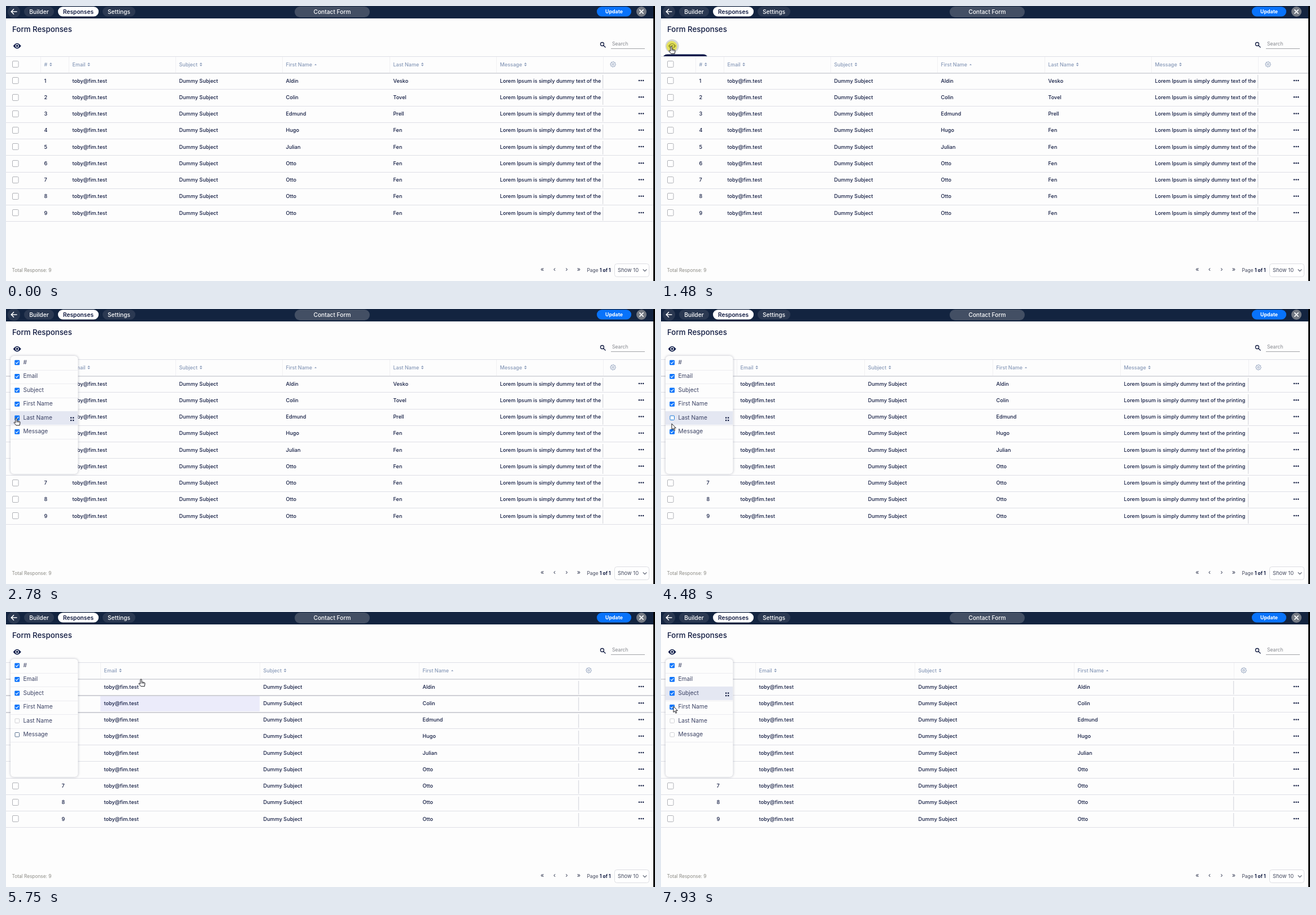
Recreate the animation shown at these times as an HTML page with a canvas. Size 1149 by 487 pixels, loop 8000 ms.

```html
<!DOCTYPE html>
<html lang="en">
<head>
<meta charset="utf-8">
<title>Form Responses</title>
<style>
  html, body { margin: 0; width: 100%; height: 100%; overflow: hidden; background: #fdfdfd; }
  canvas { display: block; }
</style>
</head>
<body>
<canvas id="stage" width="1149" height="487"></canvas>
<script>
const ctx = document.getElementById('stage').getContext('2d');
const LOOP = 8000;
const NAVY = '#101a40', LABEL = '#8799b8', LINE = '#dedfe6', PAPER = '#fdfdfd', BLUE = '#0873fb';

const FIELDS = ['#', 'Email', 'Subject', 'First Name', 'Last Name', 'Message'];
const PEOPLE = [['Aldin', 'Vesko'], ['Colin', 'Tovel'], ['Edmund', 'Prell'], ['Hugo', 'Fen'], ['Julian', 'Fen'],
  ['Otto', 'Fen'], ['Otto', 'Fen'], ['Otto', 'Fen'], ['Otto', 'Fen']];
// Column edges with zero, one and two hidden columns
const EDGES = [
  [61, 111, 300, 489, 679, 868, 1057],
  [74, 134, 360, 587, 813, 1040],
  [92, 167, 449, 731, 1014]
];
const HIDE_LAST = 3630, HIDE_MESSAGE = 5030;
const PANEL_OPEN = [[1560, 6300], [7610, LOOP]];
const TOOLTIPS = [[1270, 1560], [6830, 7610]];
const CLICKS = [[1480, 1620], [3400, 3470], [4870, 4950], [6150, 6220], [7530, 7610]];
// Pointer path: time, x, y
const PATH = [[130, 60, 422], [290, 75, 250], [600, 75, 250], [1000, 45, 140], [1300, 19, 74], [1390, 18, 71.5],
  [1920, 18, 71.5], [2700, 18, 193], [4020, 18, 193], [4180, 18, 194], [4410, 18, 194.5], [4480, 19, 203],
  [4640, 18, 216], [5590, 18, 217], [5750, 239, 119], [6000, 253, 60], [6440, 255, 59],
  [6840, 31, 70], [6920, 29, 70], [7020, 19, 71], [7690, 18, 72], [7930, 22, 167]];

const EYE = new Path2D('M-7 0Q0-9.6 7 0Q0 9.6-7 0z');
const HAND = new Path2D('M-1.2.8Q0-.7 1.2.8V5l4.4 1q1.5.4 1.4 2L6.2 13H0L-4 8.3q.5-1.6 1.8-.7l1 1z');
const ARROW = new Path2D('M0 0V10.5l2.4-2.2 1.7 4 1.7-.8-1.7-3.8h3.3z');

const rowTop = i => Math.round(118.2 + 29.25 * i);
const rowMid = i => 132.3 + 29.25 * i;
const itemTop = i => Math.round(83 + 24.5 * i);
const itemMid = i => 94.5 + 24.5 * i;
const spanAt = (spans, t) => spans.find(([a, b]) => t >= a && t < b);

function rect(x, y, w, h, fill) {
  ctx.fillStyle = fill;
  ctx.fillRect(x, y, w, h);
}
function box(x, y, w, h, r, fill, stroke) {
  ctx.beginPath();
  ctx.roundRect(x, y, w, h, r);
  if (fill) { ctx.fillStyle = fill; ctx.fill(); }
  if (stroke) { ctx.strokeStyle = stroke; ctx.lineWidth = 1; ctx.stroke(); }
}
function disc(x, y, r, fill) {
  ctx.beginPath();
  ctx.arc(x, y, r, 0, 7);
  ctx.fillStyle = fill;
  ctx.fill();
}
function stroke(d, color, width, x = 0, y = 0) {
  ctx.save();
  ctx.translate(x, y);
  ctx.strokeStyle = color;
  ctx.lineWidth = width;
  ctx.stroke(new Path2D(d));
  ctx.restore();
}
// Text centred vertically on its capitals; returns its right edge
function text(str, x, mid, size, color = NAVY, weight = 500, align = 'left') {
  ctx.font = `${weight} ${size}px Inter, sans-serif`;
  ctx.textAlign = align;
  ctx.fillStyle = color;
  ctx.fillText(str, x, mid + size * .36);
  return x + ctx.measureText(str).width;
}

function pointerAt(t) {
  const i = PATH.findIndex(p => p[0] > t);
  if (i === 0) return { x: PATH[0][1], y: PATH[0][2] };
  const b = PATH.at(i), a = i < 0 ? b : PATH[i - 1];
  const k = a === b ? 0 : (t - a[0]) / (b[0] - a[0]);
  return { x: a[1] + (b[1] - a[1]) * k, y: a[2] + (b[2] - a[2]) * k };
}

function drawBar() {
  const pill = (label, x, w, fill, color, size, weight) => {
    box(x, 1.3, w, 17.2, 8.6, fill);
    text(label, x + w / 2, 10, size, color, weight, 'center');
  };
  rect(0, 0, 1146, 22, '#132440');
  disc(14, 10, 11, '#2a3851');
  stroke('M19.5 10H9.5M14 5.3L9.3 10L14 14.7', '#fff', 1.6);
  pill('Builder', 32, 53, '#2b3952', '#fff', 10.3, 500);
  pill('Responses', 92, 72, '#fff', NAVY, 10.2, 600);
  pill('Settings', 171, 58, '#2b3952', '#fff', 10.2, 500);
  box(511, 1, 133, 19, 9.5, '#434f64');
  text('Contact Form', 577.5, 10.5, 10.2, '#fff', 500, 'center');
  pill('Update', 1046, 61, BLUE, '#fff', 8.8, 700);
  disc(1125, 10, 9, '#747a84');
  stroke('M-3.6-3.6L3.6 3.6M3.6-3.6L-3.6 3.6', '#fff', 1.6, 1125, 10);
}

function drawTools(eyeHover, clicking) {
  text('Form Responses', 11, 41, 13.3, NAVY, 500);
  if (eyeHover) disc(19.7, 71, 12, clicking ? '#d4d6d8' : '#ececef');
  ctx.save();
  ctx.translate(19.7, 70.7);
  ctx.fillStyle = '#0c1b49';
  ctx.fill(EYE);
  ctx.restore();
  disc(19.7, 70.7, 3.1, '#fff');
  disc(19.7, 70.7, 1.9, '#0c1b49');
  stroke('M3 0A3 3 0 1 1-3 0A3 3 0 1 1 3 0M2.2 2.2L6 6', NAVY, 1.3, 1055.5, 67.5);
  text('Search', 1073, 67, 8.6, '#83868c', 400);
  rect(1071, 75, 60, 1, '#a2a4a8');
}

function drawSort(x, both) {
  ctx.fillStyle = LABEL;
  ctx.fill(new Path2D(both ? `M${x - 2.3} 102.8h4.6l-2.3-2.5zM${x - 2.3} 104.2h4.6l-2.3 2.5z`
    : `M${x - 2} 104.7h4l-2-2.2z`));
}

function drawGear(x, y) {
  let d = '';
  for (let i = 0; i < 32; i++) {
    const a = i / 16 * Math.PI, r = i % 4 < 2 ? 4.8 : 3.8;
    d += (i ? 'L' : 'M') + (x + r * Math.cos(a)) + ' ' + (y + r * Math.sin(a));
  }
  stroke(d + 'z', LABEL, 1);
  stroke('M1.6 0A1.6 1.6 0 1 1-1.6 0A1.6 1.6 0 1 1 1.6 0', LABEL, 1, x, y);
}

function drawTable(hidden, hover) {
  const edges = EDGES[hidden], end = edges.at(-1);
  const fields = FIELDS.filter(f => !(hidden > 0 && f === 'Last Name' || hidden > 1 && f === 'Message'));
  const message = 'Lorem Ipsum is simply dummy text of the' + (hidden ? ' printing' : '');
  rect(0, 89, 1146, 1, LINE);
  box(11.5, 97.5, 10.5, 11, 1.5, '#fff', '#b0b2b7');
  fields.forEach((f, i) => {
    const right = text(f, edges[i] + 6.5, 103.3, 9, LABEL);
    drawSort(right + 6, f !== 'First Name');
  });
  edges.forEach(x => rect(x, 90, 1, 28, '#f0f0f3'));
  drawGear(end + 17.7, 103.3);

  PEOPLE.forEach(([first, last], r) => {
    const y = rowMid(r), top = rowTop(r);
    if (hover && hover.row === r) {
      const bounds = [0, ...edges, 1146], c = bounds.findIndex(x => x > hover.x) - 1;
      rect(bounds[c], top + 1, bounds[c + 1] - bounds[c], 28, '#ebebfa');
    }
    box(11.5, Math.round(y) - 5.5, 10.5, 11, 1.5, '#fff', '#b0b2b7');
    const values = { '#': r + 1, Email: 'toby@fim.test', Subject: 'Dummy Subject',
      'First Name': first, 'Last Name': last, Message: message };
    ctx.save();
    ctx.beginPath();
    ctx.rect(0, top, end - 1, 30);
    ctx.clip();
    fields.forEach((f, i) => text(String(values[f]), edges[i] + 6.5, y, 9.15, NAVY, 550));
    ctx.restore();
    rect(end - 1, top + 4, 1, 24, '#dcdde2');
    rect(end, top + 4, 1, 24, '#f1f1f4');
    for (let i = 0; i < 3; i++) disc(1121 + i * 3.6, y - .3, 1.25, NAVY);
  });
  for (let r = 0; r <= PEOPLE.length; r++) rect(0, rowTop(r), 1146, 1, LINE);
  rect(0, 118, 1146, 2, '#dadbe0');
  if (hover) [0, 1].forEach(n => rect(0, rowTop(hover.row + n), 1146, 2, '#cfd0d6'));
}

function drawFooter() {
  text('Total Response: 9', 10.5, 467.7, 8.3, '#8b8a84', 400);
  ['«', '‹', '›', '»'].forEach((s, i) => text(s, 949.5 + i * 21.5, 466.5, 10.5, '#4c5268', 500, 'center'));
  text('Page', 1028.5, 467.7, 8.4, '#42475c', 400);
  text('1 of 1', 1051, 467.7, 8.3, NAVY, 700);
  box(1077.5, 456.5, 61, 23, 4, '#fff', '#dcdde2');
  text('Show 10', 1083, 468, 9.4, '#454b60', 400);
  stroke('M-3.3-1.7L0 1.7L3.3-1.7', '#555b6c', 1.1, 1131, 468);
}

function drawPanel(t, hovered) {
  const opened = spanAt(PANEL_OPEN, t)[0];
  ctx.save();
  ctx.globalAlpha = Math.min(1, .4 + (t - opened) / 130);
  ctx.save();
  ctx.shadowColor = 'rgba(30,35,70,.3)';
  ctx.shadowBlur = 4;
  box(8, 83, 119.5, 209, 6, PAPER);
  ctx.restore();
  FIELDS.forEach((f, i) => {
    const y = itemMid(i);
    if (i === hovered) {
      rect(8, itemTop(i), 119, 24, '#e4e7f2');
      for (const x of [114, 118]) for (const dy of [-1, 3.5]) rect(x, y + dy, 2.3, 2.3, NAVY);
    }
    rect(8, itemTop(i + 1), 119, 1, '#ececf0');
    const off = i === 4 && t >= HIDE_LAST || i === 5 && t >= HIDE_MESSAGE;
    if (off) {
      const focused = i === 4 ? t < HIDE_MESSAGE : t < 6300;
      box(16, y - 3.5, 7.5, 7.5, 1, '#fff', focused ? (i === hovered ? '#1677d6' : '#5b7391') : '#cfd0d4');
    } else {
      box(15.3, y - 4, 8.8, 8.8, 1.2, BLUE);
      stroke('M-2.6 0L-.8 1.9L2.7-2', '#fff', 1.2, 19.7, y + .4);
    }
    text(f, 30.5, y - .5, 10.2, '#3a4163', 400);
  });
  ctx.restore();
}

function drawTooltip(t, start) {
  const scale = Math.min(1, .35 + (t - start) / 280);
  ctx.save();
  if (t >= 1480 && t < 1560) {
    ctx.beginPath();
    ctx.rect(0, 80, 100, 9);
    ctx.clip();
  }
  ctx.translate(43, 93.5);
  ctx.scale(scale, scale);
  box(-40, -8, 80, 16, 8, '#07194a');
  text('Column Visibility', 0, 0, 8.4, '#fff', 600, 'center');
  ctx.restore();
}

function drawPointer({ x, y }, shape) {
  ctx.save();
  ctx.translate(x, y);
  ctx.fillStyle = '#fff';
  ctx.fill(shape);
  ctx.strokeStyle = '#1c1c22';
  ctx.lineWidth = 1;
  ctx.stroke(shape);
  if (shape === HAND) stroke('M1.2 5V8M3.2 6V8.3M5 6.4V8.5', '#1c1c22', .8);
  ctx.restore();
}

function draw(t) {
  const visible = t >= 130, open = spanAt(PANEL_OPEN, t), click = spanAt(CLICKS, t), tip = spanAt(TOOLTIPS, t);
  const pointer = pointerAt(t), late = pointerAt(t - 50);   // hover trails the pointer slightly
  const overEye = visible && Math.hypot(late.x - 19.5, late.y - 71) < 13;
  const overPanel = open && late.x > 8 && late.x < 127 && late.y > 83 && late.y < 292;
  const item = overPanel ? Math.floor((late.y - 83) / 24.5) : -1;
  const row = Math.floor((late.y - 118.2) / 29.25);
  const hover = visible && !overPanel && row >= 0 && row < PEOPLE.length ? { row, x: late.x } : null;
  const overCheck = item >= 0 && item < 6 && late.x < 25 && Math.abs(late.y - itemMid(item)) < 3;

  rect(0, 0, 1149, 487, PAPER);
  drawBar();
  drawTools(overEye && (!open || t - open[0] < 130), click);
  drawTable(t < HIDE_LAST ? 0 : t < HIDE_MESSAGE ? 1 : 2, hover);
  drawFooter();
  if (open) drawPanel(t, item);
  if (tip) drawTooltip(t, tip[0]);
  if (click) disc(pointer.x + 1, pointer.y, 9.5, 'rgba(236,230,30,.65)');
  if (visible) drawPointer(pointer, overEye || hover || overCheck ? HAND : ARROW);
  rect(1146, 0, 3, 487, '#000');
}

function tick() {
  draw(performance.now() % LOOP);
  requestAnimationFrame(tick);
}
tick();
</script>
</body>
</html>
```
